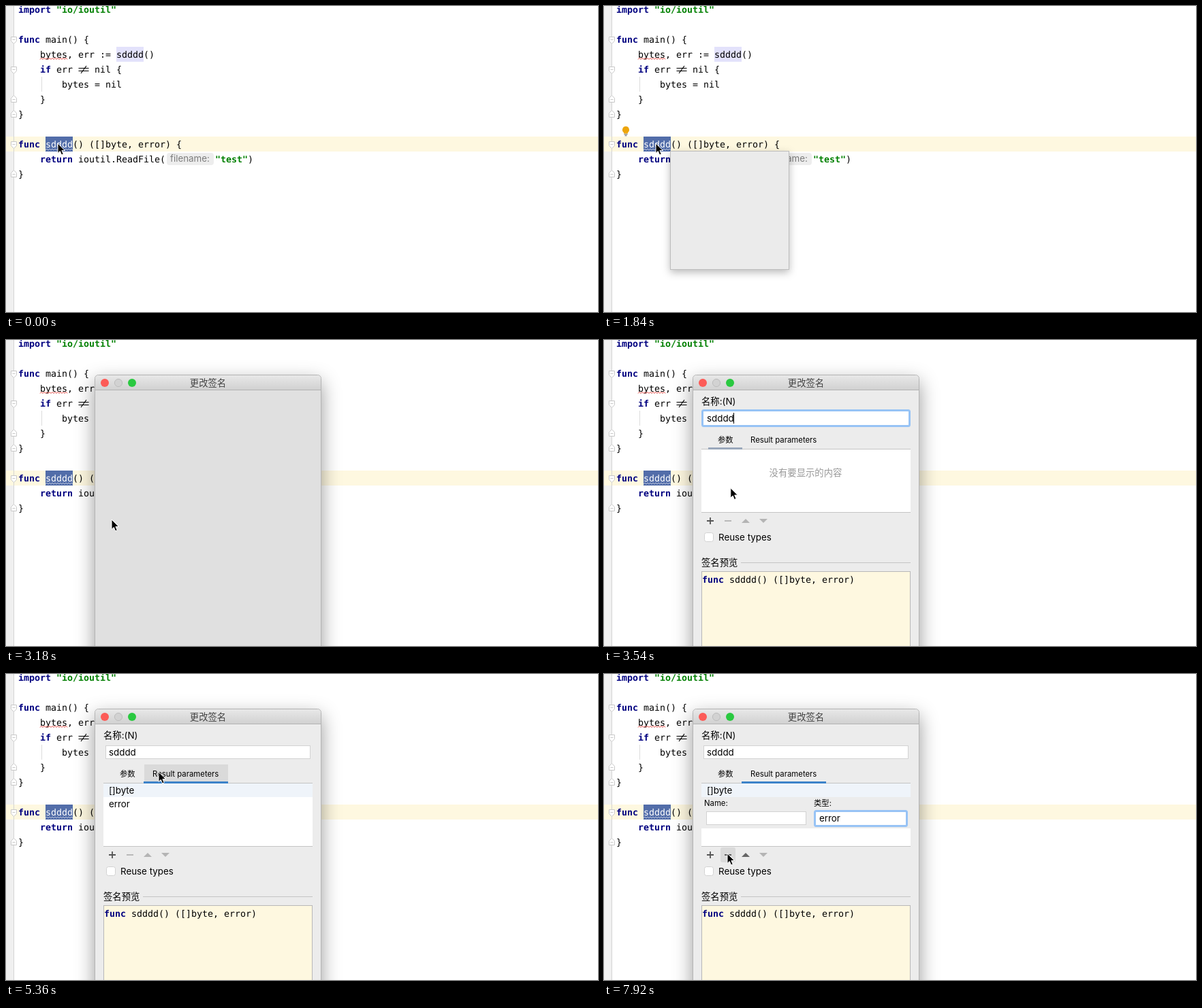
These frames come from a looping animation (869x450 px, 8 s). An HTML page:

```html
<!DOCTYPE html>
<html lang="zh-CN">
<head>
<meta charset="utf-8">
<style>
  html, body { margin: 0; width: 100%; height: 100%; overflow: hidden; background: #fff; }
  svg { display: block; font: 13.35px Inter, "Noto Sans CJK SC", "Noto Sans CJK", "DejaVu Sans", sans-serif; }
  text { white-space: pre; }
  .code { font: 13.29px "DejaVu Sans Mono", monospace; text-rendering: geometricPrecision; }
  .kw { fill: #000080; font-weight: bold; }
  .str { fill: #008000; font-weight: bold; }
  .small { font-size: 11.35px; }
  .mid { text-anchor: middle; }
  .end { text-anchor: end; fill: #555; }
  .field { fill: #fff; stroke: #d2d2d2; }
  .ring { fill: #fff; stroke: #97c3f5; stroke-width: 3; }
  .rule { stroke: #c4c4c4; }
  .fold { fill: #fff; stroke: #c8c8c8; }
  .picked { fill: #fff; font-weight: bold; }
  .hover { fill: #dadada; }
</style>
</head>
<body>
<svg width="869" height="450" viewBox="0 0 869 450">
  <defs>
    <linearGradient id="bar" x2="0" y2="1"><stop stop-color="#e8e8e8"/><stop offset="1" stop-color="#d0d0d0"/></linearGradient>
    <path id="foldDown" class="fold" d="M-4-4.5h8v6l-4 4-4-4zM-2-.5h4"/>
    <path id="foldUp" class="fold" d="M-4 5.500h8v-6l-4-4-4 4zM-2 1.500h4"/>
  </defs>

  <rect width="11" height="450" fill="#f0f0f0"/>
  <rect y="192" width="869" height="22" fill="#fef8e0"/>
  <path d="M11.500 0V450" stroke="#d4d4d4"/>
  <path d="M52.500 104v22" stroke="#dcdcdc"/>
  <g id="folds"></g>
  <rect x="162" y="60" width="40" height="22" fill="#e3e2fb"/>
  <rect x="58" y="192" width="40" height="22" fill="#526da9"/>
  <rect x="236" y="216" width="69" height="18" rx="4" fill="#ededed"/>
  <text x="241" y="229" fill="#7c7c7c">filename:</text>
  <g class="code">
    <text x="18" y="10"><tspan class="kw">import</tspan> <tspan class="str">"io/ioutil"</tspan></text>
    <text x="18" y="54"><tspan class="kw">func</tspan> main() {</text>
    <text x="50" y="76">bytes, err := sdddd()</text>
    <text x="50" y="98"><tspan class="kw">if</tspan> err    nil {</text>
    <text x="82" y="120">bytes = nil</text>
    <text x="50" y="142">}</text>
    <text x="18" y="164">}</text>
    <text x="18" y="208"><tspan class="kw">func</tspan> <tspan fill="#fff">sdddd</tspan>() ([]byte, error) {</text>
    <text x="50" y="230"><tspan class="kw">return</tspan> ioutil.ReadFile(</text>
    <text x="307" y="230"><tspan class="str">"test"</tspan>)</text>
    <text x="18" y="252">}</text>
  </g>
  <path d="M106.500 91.500h15m-15 4h15M110 99l8-11" stroke="#000" stroke-width="1.200"/>
  <path id="errorWave" fill="none" stroke="#e0403a"/>
  <path id="selectionWave" fill="none" stroke="#b9c4dc"/>
  <rect id="codeCaret" x="98" y="193" width="2" height="20"/>
  <g id="bulb">
    <path d="M32 177a5 5 0 0 1 3 9v1.500h-6V186a5 5 0 0 1 3-9z" fill="#eda50c"/>
    <path d="M29.500 188.700h5m-4 2h3" stroke="#777" stroke-width="1.200"/>
  </g>

  <g id="menu">
    <rect x="97.500" y="213.500" width="174" height="174" fill="#ebebeb" stroke="#bdbdbd" style="filter:drop-shadow(0 4px 6px #0004)"/>
    <g id="menuItems">
      <rect x="98" y="238" width="173" height="149" fill="#fff"/>
      <rect x="98" y="214" width="173" height="24" fill="#dedede"/>
      <text class="mid" x="186" y="230">Refactor This</text>
      <rect id="menuPick" x="98" width="173" height="20" fill="#3e71e6"/>
      <path d="M98 281.500h173M98 336.500h59m54 0h60" stroke="#b8b8b8"/>
      <text class="mid" x="184" y="341" fill="#8a8a8a" font-weight="bold">提取(X)</text>
      <g id="rows"></g>
    </g>
  </g>

  <g id="dialog">
    <rect x="130.500" y="51.500" width="332" height="560" rx="5" fill="#e0e0e0" stroke="#b4b4b4" style="filter:drop-shadow(0 10px 14px #0006)"/>
    <path d="M131 74V57q0-5 5-5h321q5 0 5 5v17z" fill="url(#bar)"/>
    <path d="M131 73.500h331" stroke="#b3b3b3"/>
    <circle cx="145" cy="63" r="6" fill="#fc5b57"/>
    <circle cx="165" cy="63" r="5.600" fill="#d2d2d2" stroke="#bdbdbd"/>
    <circle cx="185" cy="63" r="6" fill="#2ac940"/>
    <text class="mid" x="296.500" y="68" fill="#444">更改签名</text>
    <g id="form">
      <rect x="131" y="74" width="331" height="376" fill="#ececec"/>
      <text x="143" y="95">名称:(N)</text>
      <rect class="field" x="146.500" y="105.500" width="300" height="19"/>
      <rect id="nameRing" class="ring" x="144.500" y="103.500" width="304" height="23" rx="2"/>
      <text x="151" y="120">sdddd</text>
      <rect id="nameCaret" x="190" y="107" width="1" height="16"/>

      <rect id="tabHover" class="hover" x="203" y="133" width="123" height="27"/>
      <text class="small" x="167" y="151">参数</text>
      <text class="small" x="215" y="151">Result parameters</text>
      <rect x="143" y="161" width="307" height="92" fill="#fff"/>
      <path class="rule" d="M143 160.500h307M143 253.500h307"/>
      <g id="emptyTab">
        <rect x="153" y="158" width="50" height="3" fill="#9aa8bb"/>
        <text class="mid" x="296" y="200" fill="#999">没有要显示的内容</text>
      </g>
      <g id="resultTab">
        <rect x="202" y="158" width="124" height="3" fill="#3d83c9"/>
        <rect x="143" y="161" width="307" height="20" fill="#eff4fa"/>
        <text x="151" y="176">[]byte</text>
        <text x="151" y="196">error</text>
      </g>
      <g id="editor">
        <rect x="143" y="181" width="307" height="46" fill="#ececec"/>
        <text class="small" x="147" y="194">Name:</text>
        <text class="small" x="308" y="194">类型:</text>
        <rect class="field" x="150.500" y="202.500" width="146" height="19"/>
        <rect class="ring" x="309.500" y="201.500" width="135" height="22" rx="2"/>
        <text x="316" y="217">error</text>
        <rect id="typeCaret" x="347" y="204" width="1" height="16"/>
      </g>

      <rect id="plusHover" class="hover" x="145" y="255" width="22" height="22" rx="3"/>
      <rect id="minusHover" class="hover" x="171" y="255" width="22" height="22" rx="3"/>
      <path d="M151 266h10m-5-5v10" stroke="#555" stroke-width="1.800"/>
      <path id="minus" d="M177 266h10" stroke-width="1.800"/>
      <path id="up" d="M202 269l6-6 6 6z"/>
      <path d="M228 263l6 6 6-6z" fill="#b4b4b4"/>
      <rect class="field" x="147.500" y="283.500" width="13" height="13" rx="3"/>
      <text x="168" y="295">Reuse types</text>
      <text x="143" y="332">签名预览</text>
      <path class="rule" d="M201 327.500h249"/>
      <rect x="143.500" y="340.500" width="306" height="200" fill="#fef8e0" stroke="#b8b8b8"/>
      <text class="code" x="144" y="357"><tspan class="kw">func</tspan> sdddd() ([]byte, error)</text>
    </g>
  </g>

  <g id="pointer" stroke="#fff" stroke-linejoin="round">
    <path id="arrow" d="M0 0v14.500l3.300-3.100 2.300 5.500 2.600-1.100-2.300-5.300h4.600z"/>
    <path id="hand" fill="#fff" stroke="#000" stroke-width="1.200" d="M-1.500 9V0q0-1.500 1.300-1.500T1.300 0v4q2-1 2.600.6 2-.7 2.500.7 2-.3 2 1.700v3q0 2-1.600 3.500v1.700H-.5q-1-2.500-3-4.500t-1-3 3 1z"/>
  </g>
</svg>
<script>
const $ = id => document.getElementById(id);
const show = (id, on) => $(id).setAttribute('visibility', on ? 'inherit' : 'hidden');

$('folds').innerHTML = [50, 94, 204].map(y => `<use href="#foldDown" x="11.5" y="${y}"/>`).join('') +
  [136, 158, 246].map(y => `<use href="#foldUp" x="11.5" y="${y}"/>`).join('');
$('errorWave').setAttribute('d', 'M50 78.5' + 'l2-2 2 2'.repeat(10));
$('selectionWave').setAttribute('d', 'M58 212' + 'l2-2 2 2'.repeat(10));

const rows = [
  [248, '1. 重命名...(R)', '⇧F6'], [268, '2. 更改签名...(G)', '⌘F6'],
  [295, '3. 移动...(M)', 'F6'], [315, '4. Copy File...', 'F5'],
  [357, '5. 引入变量...(V)', '⌥⌘V'], [377, '6. 引入常量...(C)', '⌥⌘C']
];
$('rows').innerHTML = rows.map(([y, label, keys]) =>
  `<g><text x="106" y="${y + 4}">${label}</text><text class="end" x="260" y="${y + 5}">${keys}</text></g>`).join('');

// Pointer moves: first step time, last step time, steps, x, y
const moves = [
  [2460, 2640, 3, 150, 262], [2730, 2820, 2, 155, 264],
  [3450, 3790, 5, 232, 148], [3880, 4220, 5, 185, 266],
  [4310, 5000, 9, 224, 144], [5620, 6060, 6, 174, 196],
  [6240, 6320, 2, 172, 194], [6500, 6500, 1, 173.5, 193.5],
  [6860, 7650, 10, 178, 266], [7830, 7920, 2, 181, 264]
];

function pointerAt(t) {
  let x = 76, y = 202;
  for (const [start, stop, steps, toX, toY] of moves) {
    if (t < start) break;
    const gap = (stop - start) / Math.max(1, steps - 1) || 1;
    const k = Math.min(1, (Math.floor((t - start) / gap + .01) + 1) / steps);
    x += (toX - x) * k;
    y += (toY - y) * k;
  }
  return [x, y];
}

const blink = (t, offAt) => Math.abs(Math.floor((t - offAt) / 530) % 2) === 1;

function draw(t) {
  const [x, y] = pointerAt(t);
  const over = (left, top, w, h) => x >= left && x < left + w && y >= top && y < top + h;
  const menuReady = t >= 1930 && t < 3000;
  const results = t >= 5360, editing = t >= 6860;

  show('codeCaret', t < 1840 && blink(t, 780));
  show('bulb', t >= 600 && t < 1930);
  show('menu', t >= 1760 && t < 3000);
  show('menuItems', menuReady);
  const picked = y > 258 ? 1 : 0;
  $('menuPick').setAttribute('y', rows[picked][0] - 10);
  [...$('rows').children].forEach((row, i) => {
    row.firstChild.setAttribute('class', i === picked ? 'picked' : '');
    row.lastChild.style.fill = i === picked ? '#fff' : '';
  });

  show('dialog', t >= 3090);
  show('form', t >= 3270);
  show('nameRing', !results);
  show('nameCaret', !results && blink(t, 3590));
  show('tabHover', over(203, 133, 123, 27));
  show('emptyTab', !results);
  show('resultTab', results);
  show('editor', editing);
  show('typeCaret', t >= 7300 && t < 7830);
  show('plusHover', over(145, 255, 22, 22));
  show('minusHover', editing && over(171, 255, 22, 22));
  $('minus').setAttribute('stroke', editing ? '#555' : '#b4b4b4');
  $('up').setAttribute('fill', editing ? '#666' : '#b4b4b4');

  const pointing = menuReady && y > 238;
  show('arrow', !pointing);
  show('hand', pointing);
  $('pointer').setAttribute('transform', `translate(${x} ${y})`);
}

function loop() {
  draw(performance.now() % 8000);
  requestAnimationFrame(loop);
}
loop();
</script>
</body>
</html>
```
